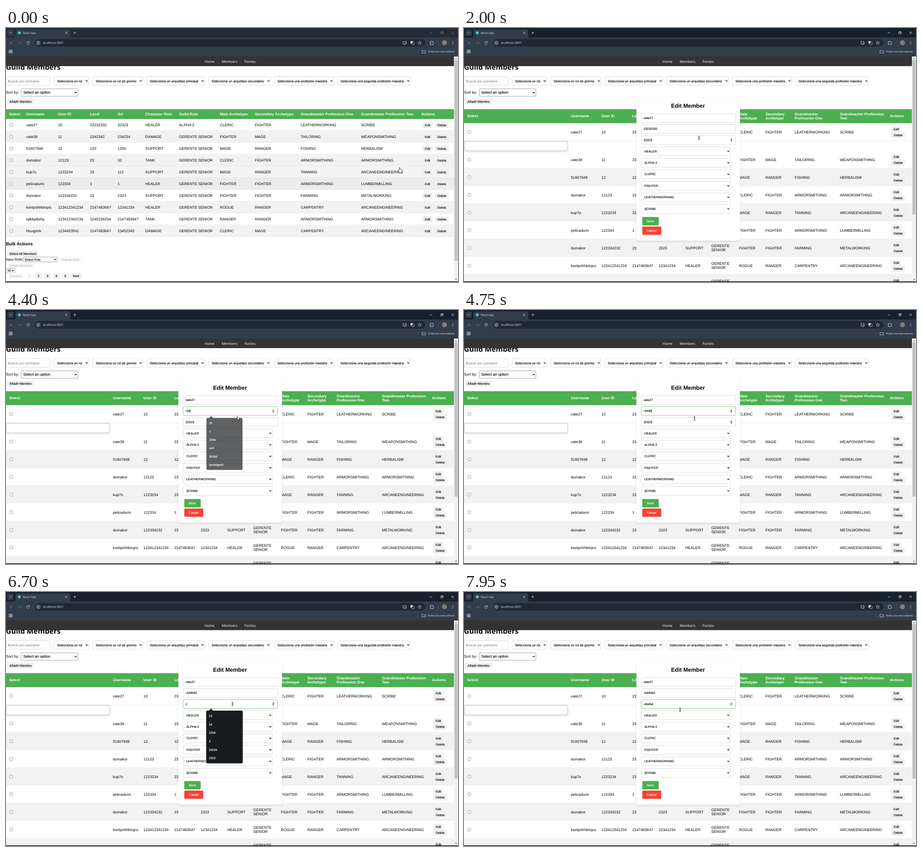
An HTML page for the animation above (8 s loop, 998 px wide and 561 px high).

```html
<!DOCTYPE html>
<html lang="es">
<head>
<meta charset="utf-8">
<title>Guild Members</title>
<style>
html, body { margin: 0; width: 100%; height: 100%; overflow: hidden; background: #fff; }
svg { display: block; width: 998px; height: 561px; font-family: "Liberation Sans", Arial, sans-serif; text-rendering: geometricPrecision; }
text { white-space: pre; }
.ui { font-family: "Open Sans", "Noto Sans", sans-serif; }
.bold { font-weight: 700; }
.line { fill: none; stroke-linecap: round; stroke-linejoin: round; }
</style>
</head>
<body>
<svg id="stage" viewBox="0 0 998 561"></svg>
<script>
const GREEN = '#4CAF50', BASE = 8.32, SMALL = 6.93, MID = 7.28;
const LOOP = 8000;

// ---- drawing helpers: text is placed by its left edge and vertical centre
const rect = (x, y, w, h, fill, extra = '') =>
  `<rect x="${x}" y="${y}" width="${w}" height="${h}" fill="${fill}" ${extra}/>`;
const text = (x, cy, label, size = BASE, fill = '#000', extra = '') =>
  `<text x="${x}" y="${cy + size * .345}" font-size="${size}" fill="${fill}" ${extra}>${label}</text>`;
const small = (x, cy, label, fill = '#000', size = SMALL, extra = '') =>
  text(x, cy, label, size, fill, `stroke="${fill}" stroke-width=".14" ${extra}`);
const line = (d, color, width = 1, extra = '') =>
  `<path class="line" d="${d}" stroke="${color}" stroke-width="${width}" ${extra}/>`;
const circle = (x, y, r, fill) => `<circle cx="${x}" cy="${y}" r="${r}" fill="${fill}"/>`;
const box = (x, y, w, h, stroke = '#ccc', r = 2, extra = '') =>
  rect(x, y, w, h, '#fff', `stroke="${stroke}" stroke-width=".7" rx="${r}" ${extra}`);
const select = (x, y, w, h, label, size, pad, stroke, r) =>
  box(x, y, w, h, stroke, r) + small(x + pad, y + h / 2, label, '#000', size) +
  line(`M${x + w - 6.5} ${y + h / 2 - .8}l1.8 1.7 1.8-1.7`, '#000', 1.2);
const button = (x, cy, w, label, pad = 5.5, off = false, extra = '') =>
  rect(x, cy - 6.3, w, 12.6, off ? '#fafafa' : '#efefef', `rx="1.2" ${extra}`) +
  small(x + pad, cy, label, off ? '#b8b8b8' : '#000');
const checkbox = cy => box(8.4, cy - 3.2, 6.5, 6.5, '#767676', 1.3);

// ---- data
const members = `vate27|10|23232332|32323|HEALER|ALPHA 2|CLERIC|FIGHTER|LEATHERWORKING|SCRIBE
vate38|11|2342342|234234|DAMAGE|GERENTE SENIOR|FIGHTER|MAGE|TAILORING|WEAPONSMITHING
51607948|12|120|1200|SUPPORT|GERENTE SENIOR|MAGE|RANGER|FISHING|HERBALISM
dumakor|12123|23|32|TANK|GERENTE SENIOR|CLERIC|FIGHTER|ARMORSMITHING|ARMORSMITHING
kup7o|1223234|23|112|SUPPORT|GERENTE SENIOR|MAGE|RANGER|TANNING|ARCANEENGINEERING
pelicadumi|122334|1|1|HEALER|GERENTE SENIOR|FIGHTER|FIGHTER|ARMORSMITHING|LUMBERMILLING
dumakor|122334232|23|2323|SUPPORT|GERENTE SENIOR|FIGHTER|FIGHTER|FARMING|METALWORKING
kwrtpxhhbtrqnc|123412341234|2147483647|12341234|HEALER|GERENTE SENIOR|ROGUE|RANGER|CARPENTRY|ARCANEENGINEERING
tqlkkptbirlq|123412342134|1245236234|2147483647|TANK|GERENTE SENIOR|RANGER|RANGER|ARMORSMITHING|ARMORSMITHING
hkuqptvk|1234453541|2147483647|23452345|DAMAGE|GERENTE SENIOR|CLERIC|MAGE|CARPENTRY|ARCANEENGINEERING`
  .split('\n').map(row => row.split('|'));
const headers = ['Select', 'Username', 'User ID', 'Level', 'ilvl', 'Character Role', 'Guild Role',
  'Main Archetype', 'Secondary Archetype', 'Grandmaster Profession One', 'Grandmaster Profession Two', 'Actions'];
const wideCols = [6.8, 44.6, 115, 185.4, 246.6, 307.6, 382, 472.2, 549.4, 650.8, 784, 917];
const tightCols = [6.8, 236, 303.6, 371.5, 430, 488.8, 546, 607, 665.4, 730, 830, 940.5];

// Splits a label over two lines around the centre
const lines = (x, cy, label, at, fill, extra) => at < 0
  ? text(x, cy, label, BASE, fill, extra)
  : text(x, cy - 4.5, label.slice(0, at), BASE, fill, extra) + text(x, cy + 4.4, label.slice(at + 1), BASE, fill, extra);

const rowRect = (id, y, h, i) =>
  rect(0, y, 989, h, i % 2 ? '#f2f2f2' : '#fff', `id="${id}"`) + rect(0, y + h - .5, 989, .5, '#ddd');

function listTable() {
  let out = rect(0, 179.3, 989.2, 21.7, GREEN);
  headers.forEach((h, i) => out += text(wideCols[i], 190, h, BASE, '#fff', 'class="bold"'));
  members.forEach((row, i) => {
    const cy = 214 + i * 26;
    out += rowRect('list' + i, cy - 13, 26, i) + checkbox(cy);
    row.forEach((cell, c) => out += text(wideCols[c + 1], cy, cell));
    out += button(919.4, cy + .3, 22.3, 'Edit', 5.4, false, i ? '' : 'id="editButton"') + button(947, cy + .3, 30.4, 'Delete', 5.2);
  });
  return out;
}

function listFooter() {
  let out = text(0, 476.7, 'Bulk Actions', 9.73, '#000', 'class="bold"') +
    button(2.3, 498.4, 69.6, 'Select All Members') + text(0, 511, 'New Role:') +
    select(38.2, 506, 75, 10.6, 'Select Role', SMALL, 2.8, '#767676', 1.2) +
    button(115.7, 511.4, 50.6, 'Change Role', 5.4, true) + button(2.3, 524.4, 61, 'Delete Members', 5.5, true) +
    select(.3, 531, 19.6, 10, '10', SMALL, 2.6, '#767676', 1.2) + button(2.3, 547.4, 38, 'Previous', 5.5, true);
  for (let n = 1; n <= 5; n++) out += button(25.9 + n * 19.6, 547.4, 14, n, 5, n === 1);
  return out + button(142, 547.4, 25, 'Next', 5.4);
}

function editTable() {
  let out = rect(0, 179.3, 989.2, 31, GREEN);
  headers.forEach((h, i) => out += lines(tightCols[i], 194.6, h,
    i === 10 ? h.lastIndexOf(' ') : i > 6 && i < 10 ? h.indexOf(' ') : -1, '#fff', 'class="bold"'));
  members.slice(0, 9).forEach((row, i) => {
    const cy = i ? 252 + i * 39 - .3 : 230;
    out += rowRect('edit' + i, cy - 19.5, 39, i > 1 ? i + 1 : 0) + checkbox(cy);
    row.forEach((cell, c) => out += lines(tightCols[c + 1], cy, cell, c === 5 ? cell.indexOf(' ') : -1));
    out += button(943.2, cy - 6.2, 22.3, 'Edit') + button(943.2, cy + 6.9, 30.2, 'Delete');
  });
  return out + rect(0, 249.5, 989, 21.7, '#fff') + rect(0, 249.3, 989, .5, '#ddd') +
    box(.7, 250.3, 228.2, 21, '#a8a8a8', 3, 'filter="url(#soft)"');
}

const spinner = (id, cy) => `<g id="${id}">` + rect(587, cy - 4.5, 6.4, 9, '#f0f0f0') +
  `<path d="M588.2 ${cy - .7}l2-2.2 2 2.2zm0 1.4l2 2.2 2-2.2z" fill="#404040"/></g>`;

const numberField = (id, y) => box(391.2, y, 208.4, 19.4, '#ccc', 2, `id="${id}Box"`) +
  rect(396.4, y + 5.4, 0, 8.8, '#0078d7', `id="${id}Mark"`) +
  small(396.4, y + 9.7, '', '#000', SMALL, `id="${id}Text"`) +
  rect(396.4, y + 5.5, .6, 8.6, '#000', `id="${id}Caret"`) + spinner(id + 'Spin', y + 9.7);

function suggestions(id, top, items) {
  const rows = items.map((s, i) => text(448, top + 11.6 + i * 18.7, s, 6.4, '#f2f2f2', 'class="ui" font-weight="700"'));
  return `<g id="${id}">` + rect(442, top, 80.8, 116.4, '#191c1f', 'rx="3"') +
    `<path d="M447.4 ${top + .4}l5.2-4.8 5.2 4.8z" fill="#191c1f"/>` + rows.join('') + '</g>';
}

function modal() {
  let out = rect(380.6, 154, 228.6, 315.5, '#fff', 'rx="4.5" filter="url(#soft)"') +
    text(494.6, 171.3, 'Edit Member', 12.48, '#000', 'class="bold" text-anchor="middle"') +
    box(391.2, 189, 208.4, 19.4) + small(396.4, 198.7, members[0][0]) +
    numberField('level', 213.4) + numberField('ilvl', 237.8);
  members[0].slice(4).forEach((v, i) => out += select(391.2, 262.4 + i * 25.45, 197.2, 19.6, v, SMALL, 7));
  const action = (y, w, label, fill) => rect(393.6, y, w, 18.4, fill, 'rx="2"') + small(403.5, y + 9.2, label, '#fff');
  return out + action(417.6, 36.3, 'Save', GREEN) + action(438.4, 42, 'Cancel', '#f44336') +
    suggestions('levelTips', 237.7, ['23', '1', '2334', 'asd', '35355', 'luredapeli']) +
    suggestions('ilvlTips', 262, ['23', '32', '2334', '2', '23234', '2323']);
}

function pageTop() {
  const filters = [[106.2, 76.6, 'Selecciona un rol'], [191.4, 110.8, 'Selecciona un rol de gremio'],
    [311, 128, 'Selecciona un arquetipo principal'], [447.6, 136.6, 'Selecciona un arquetipo secundario'],
    [592.7, 130.8, 'Selecciona una profesión maestra'], [732, 161, 'Selecciona una segunda profesión maestra']];
  return text(0, 86.2, 'Guild Members', 15.9, '#000', 'class="ui bold"') +
    box(.3, 107.6, 97.4, 18.8) + text(4.6, 117, 'Buscar por username', MID, '#757575') +
    filters.map(([x, w, s]) => select(x, 107.6, w, 18.8, s, MID, 6.5)).join('') +
    text(0, 142.6, 'Sort by:') + select(33.4, 134.4, 125.4, 16.4, 'Select an option', BASE, 4.8, '#767676', 2) +
    button(2.3, 162.4, 59.8, 'Añadir Miembro');
}

function browser() {
  const bar = '#323d4c', dark = '#202833', ink = '#dfe3e8', dim = '#727c89';
  const ui = (x, cy, s, size) => text(x, cy, s, size, ink, 'class="ui"');
  let out = rect(0, 0, 998, 63, bar) + rect(0, 0, 998, 21, dark, 'id="strip"') +
    rect(3, 3.5, 14, 14, '#343e4c', 'rx="4"') + line('M8.3 9.7l1.9 1.9 1.9-1.9', ink, .9) +
    `<path d="M18 21q3 0 3-3V7q0-4 4-4h113q4 0 4 4v11q0 3 3 3z" fill="${bar}"/>` +
    circle(29.3, 10.6, 3.2, '#58c4dc') + ui(37, 10.8, 'React App', 6.2) +
    line('M131 8.6l4 4m0-4l-4 4M149.2 10.6h5.2m-2.6-2.6v5.2', ink, .8) +
    line('M14.5 33H8.7m2.5-2.6L8.6 33l2.6 2.6M27.5 33h5.8m-2.5-2.6l2.6 2.6-2.6 2.6', dim, .8) +
    line('M51 31.2a3 3 0 1 0 .5 2.6M51.3 29.8v1.9h-1.9', ink, .8) +
    rect(64, 24.5, 862, 16.6, dark, 'rx="8.3"') + circle(71.4, 32.8, 5.8, '#39434f') +
    `<circle cx="71.4" cy="32.8" r="3.1" fill="none" stroke="${ink}" stroke-width=".7"/>` +
    line('M71.4 32.6v1.6m0-3.1v.1', ink, .7) + ui(81.4, 33, 'localhost:3001', 6.8) +
    line('M880 29.8h-3.4v5h7.6v-1.6M879 36.4h3M882.6 29.2v3m-1.4-1.2l1.4 1.4 1.4-1.4', ink, .8) +
    rect(893, 29, 5.4, 5.4, ink, 'rx=".8"') + rect(896.2, 31.4, 5.2, 5.2, dark, `rx=".8" stroke="${ink}" stroke-width=".7"`) +
    line('M913.6 29l1.1 2.6 2.8.2-2.2 1.8.7 2.7-2.4-1.5-2.4 1.5.7-2.7-2.2-1.8 2.8-.2z', ink, .7) +
    line('M936.8 30.2h2.2a1.2 1.2 0 0 1 2.4 0h1.8v2.3a1.2 1.2 0 0 1 0 2.4v1.8h-6.4v-2a1 1 0 0 0 0-2.4z', ink, .8) +
    rect(954.2, 28, .5, 10, '#566170') + circle(968, 32.6, 5.5, '#857d74');
  for (const y of [30, 32.8, 35.6]) out += circle(986.4, y, .75, ink);
  for (const [x, y] of [[7.2, 48.7], [11.2, 48.7], [7.2, 52.7], [11.2, 52.7]])
    out += `<rect x="${x}" y="${y}" width="2.6" height="2.6" class="line" stroke="${ink}" stroke-width=".8"/>`;
  return out + rect(909.4, 47.5, .6, 9, '#566170') +
    line('M919 49.5h2.6l1 1h3.9v4.6H919z', ink, .8) + ui(931, 52, 'Todos los marcadores', 5.9) +
    line('M936 10.8h4.6M960.2 9.2h3.8v3.8h-3.8zM961.4 9.1V8h3.8v3.8h-1.1M983.8 8.3l4.6 4.6m0-4.6l-4.6 4.6', dim, .8, 'id="controls"') +
    rect(0, 63, 989.2, 21.2, '#333') +
    [[438.4, 'Home'], [476.2, 'Members'], [526.4, 'Parties']].map(([x, s]) =>
      text(x, 74, s, 7.8, '#fff', 'class="ui"')).join('') +
    rect(989.2, 63, 8.8, 497, '#f1f1f1') + rect(990.2, 71, 6.8, 443, '#c1c1c1', 'id="thumb"') +
    '<path d="M991.6 68.4l2-2.2 2 2.2zM991.6 554.2l2 2.2 2-2.2z" fill="#505050"/>' + rect(0, 559.6, 998, 1.4, '#0c0c0c');
}

const pointers = `<g id="cursor">
<path id="hand" d="M-.9 6.4V.7a.9.9 0 0 1 1.8 0V4l3.6.8q1.1.3 1 1.4l-.2 2.6-.9 3.2H0L-2.6 7.6q-.4-1.4.6-1.5z" fill="#fff" stroke="#111" stroke-width=".7"/>
<path id="arrow" d="M0 0v8.4l1.9-1.8 1.3 3 1.5-.7-1.3-2.9h2.6z" fill="#fff" stroke="#000" stroke-width=".8"/>
<path id="beam" class="line" d="M-1.8-4q1.8 0 1.8.9v6.2q0 .9-1.8.9M1.8-4Q0-4 0-3.1v6.2q0 .9 1.8.9" stroke="#222" stroke-width=".8"/></g>`;

const stage = document.getElementById('stage');
stage.innerHTML = `<defs><filter id="soft" x="-20%" y="-30%" width="140%" height="160%">
<feDropShadow dx="0" dy="1.5" stdDeviation="2.2" flood-opacity=".14"/></filter></defs>` +
  rect(0, 0, 998, 561, '#fff') + pageTop() +
  `<g id="listView">${listTable()}${listFooter()}</g><g id="editView">${editTable()}${modal()}</g>` +
  browser() + pointers;

// ---- timeline
const path = [[50, 869, 308], [250, 885, 285], [500, 908, 250], [700, 920, 228], [850, 923, 220.5],
  [1480, 923, 220.5], [1650, 870, 243], [1800, 740, 268], [1900, 620, 268], [2000, 519, 243], [2150, 512, 232],
  [2300, 511, 225], [4180, 511, 225], [4330, 510.6, 234.6], [4500, 510.6, 235], [4700, 509, 239.5],
  [4770, 509, 239.5], [4950, 500, 247.3], [7780, 500, 247.3], [7950, 477, 260]];
const shapes = [[0, 'hand'], [1905, 'arrow'], [1945, 'beam'], [4300, 'arrow'], [4600, 'beam']];
// row element, time entered, time left
const hovers = [['list5', -900, -210], ['list4', -100, 90], ['list3', 90, 300], ['list2', 300, 480],
  ['list1', 480, 710], ['list0', 710, LOOP], ['edit0', 710, 1680]];
const fields = {
  level: { focus: 2400, blur: 5050, mark: [2850, 3250], tips: [3250, 4340], centre: 296,
    hover: [[2120, 2400]],
    steps: [[0, '23232332'], [3250, '-'], [4200, '-5'], [4350, '-54'], [4550, '-544'], [4700, '-5445'], [4800, '-54454'], [4950, '-544545']] },
  ilvl: { focus: 5050, blur: LOOP, mark: [5600, 6650], tips: [6620, 6870], centre: 320,
    hover: [[1950, 2080], [4600, 5050]],
    steps: [[0, '32323'], [6650, '-'], [6850, '-4'], [6950, '-45'], [7050, '-454'], [7100, '-4545'], [7300, '-45454']] }
};

const el = id => document.getElementById(id);
const show = (id, on) => el(id).setAttribute('visibility', on ? 'inherit' : 'hidden');
const ramp = (t, from, length) => Math.min(1, Math.max(0, (t - from) / length));
const within = (t, [from, to]) => t >= from && t < to;
const stepAt = (steps, t) => steps.filter(s => s[0] <= t).pop();
const grey = v => `rgb(${v},${v},${v})`;

function pointAt(t) {
  const i = path.findIndex(p => p[0] > t);
  if (i === 0) return path[0].slice(1);
  if (i < 0) return path[path.length - 1].slice(1);
  const [t0, x0, y0] = path[i - 1], [t1, x1, y1] = path[i], k = (t - t0) / (t1 - t0);
  return [x0 + (x1 - x0) * k, y0 + (y1 - y0) * k];
}

function drawField(id, f, t) {
  const [since, value] = stepAt(f.steps, t);
  const focused = within(t, [f.focus, f.blur]), marked = within(t, f.mark);
  const label = el(id + 'Text');
  label.textContent = value;
  for (const paint of ['fill', 'stroke']) label.setAttribute(paint, marked ? '#fff' : '#000');
  const width = label.getComputedTextLength();
  el(id + 'Mark').setAttribute('width', marked ? width : 0);
  el(id + 'Caret').setAttribute('x', 396.5 + width);
  el(id + 'Box').setAttribute('stroke', focused ? GREEN : '#ccc');
  show(id + 'Caret', focused && !marked && (t - Math.max(since, f.focus)) % 1000 < 500);
  show(id + 'Spin', focused || f.hover.some(span => within(t, span)));

  const opacity = ramp(t, f.tips[0], 80) - ramp(t, f.tips[1], 200), scale = .955 + .045 * opacity;
  const tips = el(id + 'Tips');
  tips.setAttribute('opacity', opacity);
  tips.setAttribute('transform', `translate(482.4 ${f.centre}) scale(${scale}) translate(-482.4 ${-f.centre})`);
}

function draw(t) {
  const editing = t >= 1300, active = t >= 1150;
  show('listView', !editing);
  show('editView', editing);
  el('thumb').setAttribute('height', editing ? 341 : 443);
  el('controls').setAttribute('stroke', active ? '#f2f4f6' : '#727c89');
  el('strip').setAttribute('fill', active ? '#17212e' : '#222b37');
  for (const [id, enter, leave] of hovers) {
    const base = /[135]$/.test(id) ? 242 : 255;
    el(id).setAttribute('fill', grey(base + (221 - base) * (ramp(t, enter, 300) - ramp(t, leave, 300))));
  }
  el('editButton').setAttribute('fill', grey(239 - 25 * ramp(t, 780, 250)));
  for (const id in fields) drawField(id, fields[id], t);

  const shape = stepAt(shapes, t)[1];
  for (const id of ['hand', 'arrow', 'beam']) show(id, id === shape);
  el('cursor').setAttribute('transform', `translate(${pointAt(t)})`);
}

const start = performance.now();
function tick() {
  draw((performance.now() - start) % LOOP);
  requestAnimationFrame(tick);
}
tick();
</script>
</body>
</html>
```
